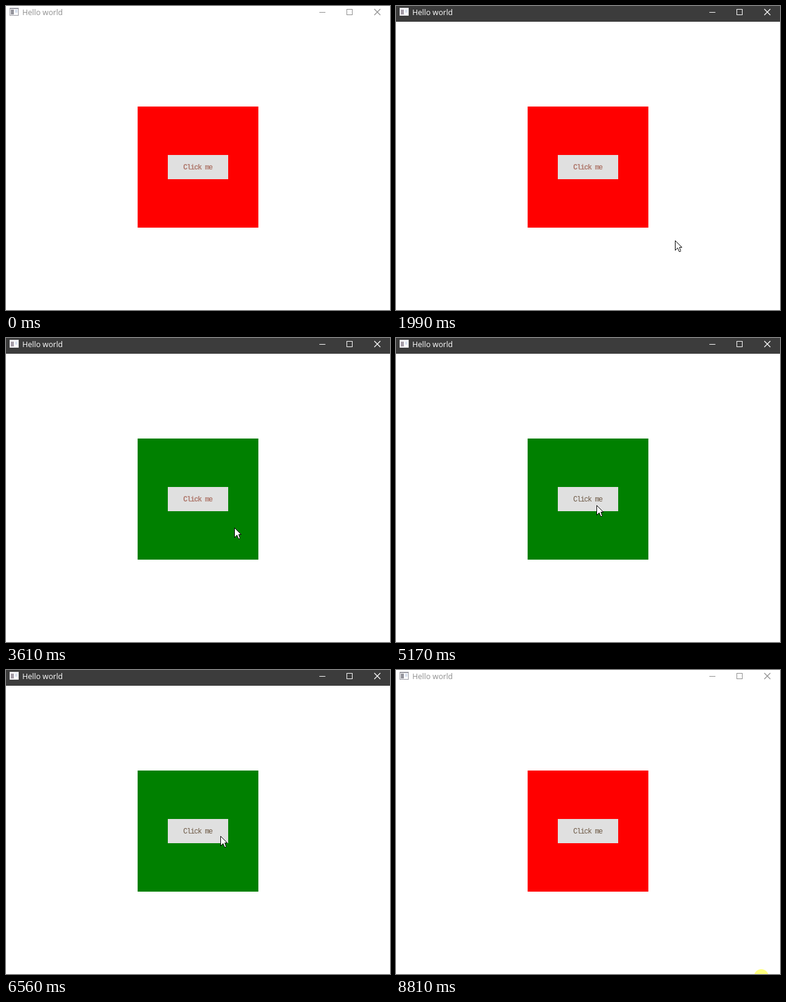
Animation, 636 px wide and 502 px high, one loop 8890 ms. Source, as an HTML page with a canvas:

```html
<!DOCTYPE html>
<html lang="en">
<head>
<meta charset="utf-8">
<title>Hello world</title>
<style>
  html, body { margin: 0; width: 100%; height: 100%; overflow: hidden; background: #fff; }
  canvas { display: block; }
</style>
</head>
<body>
<canvas id="stage" width="636" height="502"></canvas>
<script>
const ctx = document.getElementById('stage').getContext('2d');
const LOOP = 8890;
const TICK = 76.5; // the pointer is sampled about 13 times a second
const STEPS = 5;   // samples per glide
const HOLD = 160;  // how long the mouse button stays down

const square = { x: 218, y: 166, w: 200, h: 200 };
const button = { x: 268, y: 246, w: 100, h: 40 };
const taskbar = { x: 605, y: 506 };

// Each glide starts at a time and ends at a resting point
const glides = [
  { at: 140, x: 484, y: 454 },
  { at: 1070, x: 382, y: 347 },
  { at: 1760, x: 470, y: 391 },
  { at: 2300, x: 399, y: 348 },
  { at: 3070, x: 431, y: 356 },
  { at: 3530, x: 332, y: 276 },
  { at: 5700, x: 493, y: 318 },
  { at: 6100, x: 355, y: 274 },
  { at: 7810, ...taskbar },
];
const [activate, firstPress, ...otherPresses] = [460, 4310, 5000, 6710, 7260, 8810];
const presses = [activate, firstPress, ...otherPresses];
const deactivate = presses.at(-1);

const arrow = new Path2D('M.5 .5V16.5L4.5 12.5L7 18.5H9L9.5 17.5L7.5 11.5H11.5Z');

const easeOut = p => 1 - (1 - p) ** 1.5;

function pointerAt(t) {
  let { x, y } = taskbar;
  for (const glide of glides) {
    if (t < glide.at) break;
    const step = Math.floor((t - glide.at) / TICK) + 1;
    const p = easeOut(Math.min(1, step / STEPS));
    x += (glide.x - x) * p;
    y += (glide.y - y) * p;
  }
  return { x: Math.round(x), y: Math.round(y) };
}

const contains = (box, { x, y }) =>
  x >= box.x && x < box.x + box.w && y >= box.y && y < box.y + box.h;

function fillBox(color, { x, y, w, h }) {
  ctx.fillStyle = color;
  ctx.fillRect(x, y, w, h);
}

const rect = (color, x, y, w, h) => fillBox(color, { x, y, w, h });

function text(str, x, y, font, color, spacing = '0px') {
  ctx.font = font;
  ctx.letterSpacing = spacing;
  ctx.fillStyle = color;
  ctx.fillText(str, x, y);
}

function drawIcon(active) {
  rect(active ? '#ececf0' : '#9b9ba3', 6, 3, 15, 13);
  rect('#fbfbfd', 7, 5, 13, 10);
  rect(active ? '#a39ba6' : '#92929a', 8, 6, 5, 8);
  rect('#d9e1ee', 15, 6, 4, 5);
}

function drawTitleBar(active) {
  const ink = active ? '#fff' : '#8f8f8f';
  if (active) rect('#3c3c3c', 0, 0, 636, 26);
  drawIcon(active);
  text('Hello world', 27, 15, '12.6px "Open Sans", "Noto Sans", sans-serif', ink);
  rect(ink, 519, 10, 10, 1);
  ctx.strokeStyle = ink;
  ctx.lineWidth = 1;
  ctx.strokeRect(564.5, 5.5, 9, 9);
  ctx.lineWidth = 1.3;
  ctx.stroke(new Path2D('M610 5L620 15M620 5L610 15'));
}

function drawButton(pressed, fresh) {
  fillBox(pressed ? '#d0d0d0' : '#e0e0e0', button);
  const weight = fresh ? 'bold' : 'normal';
  const color = fresh ? '#b07c70' : '#6e5a46';
  text('Click me', 293.5, 270, `${weight} 12px "Liberation Mono", monospace`, color, '-1.2px');
}

function drawHalo({ x, y }) {
  ctx.fillStyle = 'rgba(255, 255, 0, 0.5)';
  ctx.beginPath();
  ctx.arc(x, y, 12, 0, Math.PI * 2);
  ctx.fill();
}

function drawPointer({ x, y }) {
  ctx.save();
  ctx.translate(x, y);
  ctx.lineWidth = 1;
  ctx.lineJoin = 'round';
  ctx.fillStyle = '#fff';
  ctx.strokeStyle = '#000';
  ctx.fill(arrow);
  ctx.stroke(arrow);
  ctx.restore();
}

function draw(t) {
  const pointer = pointerAt(t);
  const pressed = presses.some(down => t >= down && t < down + HOLD);
  rect('#fff', 0, 0, 636, 502);
  drawTitleBar(t >= activate && t < deactivate);
  fillBox(contains(square, pointer) ? '#008000' : '#f00', square);
  drawButton(pressed && contains(button, pointer), t < firstPress);
  if (pressed) drawHalo(pointer);
  drawPointer(pointer);
}

const begin = performance.now();
function frame() {
  draw((performance.now() - begin) % LOOP);
  requestAnimationFrame(frame);
}
frame();
</script>
</body>
</html>
```
